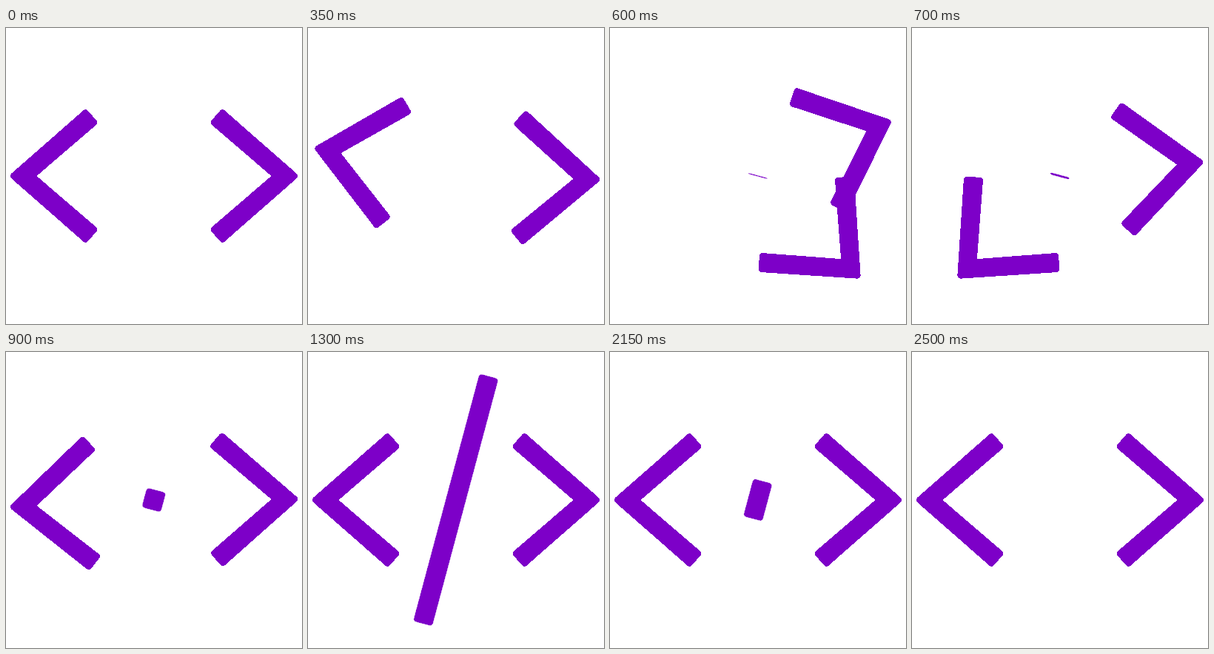
Write an HTML page that moves like this. It is 400 by 400 pixels and loops after 2650 ms.

```html
<!DOCTYPE html>
<html lang="en">
<head>
<meta charset="utf-8">
<title>Code brackets</title>
<style>
  html, body { margin: 0; width: 100%; height: 100%; overflow: hidden; background: #fff; }
  svg { display: block; width: 100%; height: 100%; }
  .ink { fill: #7d00c8; stroke: #7d00c8; stroke-linejoin: round; shape-rendering: crispEdges; }
</style>
</head>
<body>
<svg viewBox="-200 -200 400 400">
  <defs>
    <path id="bracket" stroke-width="8.3"
      d="M-190.2 0 L-92.5 -85.65 L-80.8 -72.25 L-164.9 0 L-80.8 72.25 L-92.5 85.65 Z"/>
  </defs>
  <g class="ink">
    <use id="first" href="#bracket"/>
    <use id="second" href="#bracket" transform="rotate(180)"/>
    <rect id="slash" x="-13.25" width="26" rx="4" stroke-width="0.5" transform="rotate(15)"/>
  </g>
</svg>
<script>
  const LOOP = 2650;
  const STEP = 50;
  const SLASH = 353;
  const first = document.getElementById('first');
  const second = document.getElementById('second');
  const slash = document.getElementById('slash');

  // Exponential ease in-out over a time window
  function ease(t, start, duration) {
    const p = (t - start) / duration;
    if (p <= 0) return 0;
    if (p >= 1) return 1;
    return p < 0.5 ? 2 ** (20 * p - 11) : 1 - 2 ** (9 - 20 * p);
  }

  function turn(el, degrees) {
    el.setAttribute('transform', `rotate(${degrees})`);
  }

  function draw(t) {
    turn(first, 180 * ease(t, 0, 1000));
    turn(second, 180 + 180 * ease(t, 150, 1000));

    const length = SLASH * (ease(t, 500, 1100) - ease(t, 1650, 850));
    slash.setAttribute('y', -length / 2);
    slash.setAttribute('height', length);
    slash.setAttribute('ry', Math.min(4, length / 2));
  }

  // The motion runs at 20 poses per second; the slack absorbs timer jitter
  const origin = performance.now();
  function tick() {
    const step = Math.floor((performance.now() - origin + 2) / STEP);
    draw((step * STEP) % LOOP);
    requestAnimationFrame(tick);
  }
  draw(0);
  requestAnimationFrame(tick);
</script>
</body>
</html>
```
